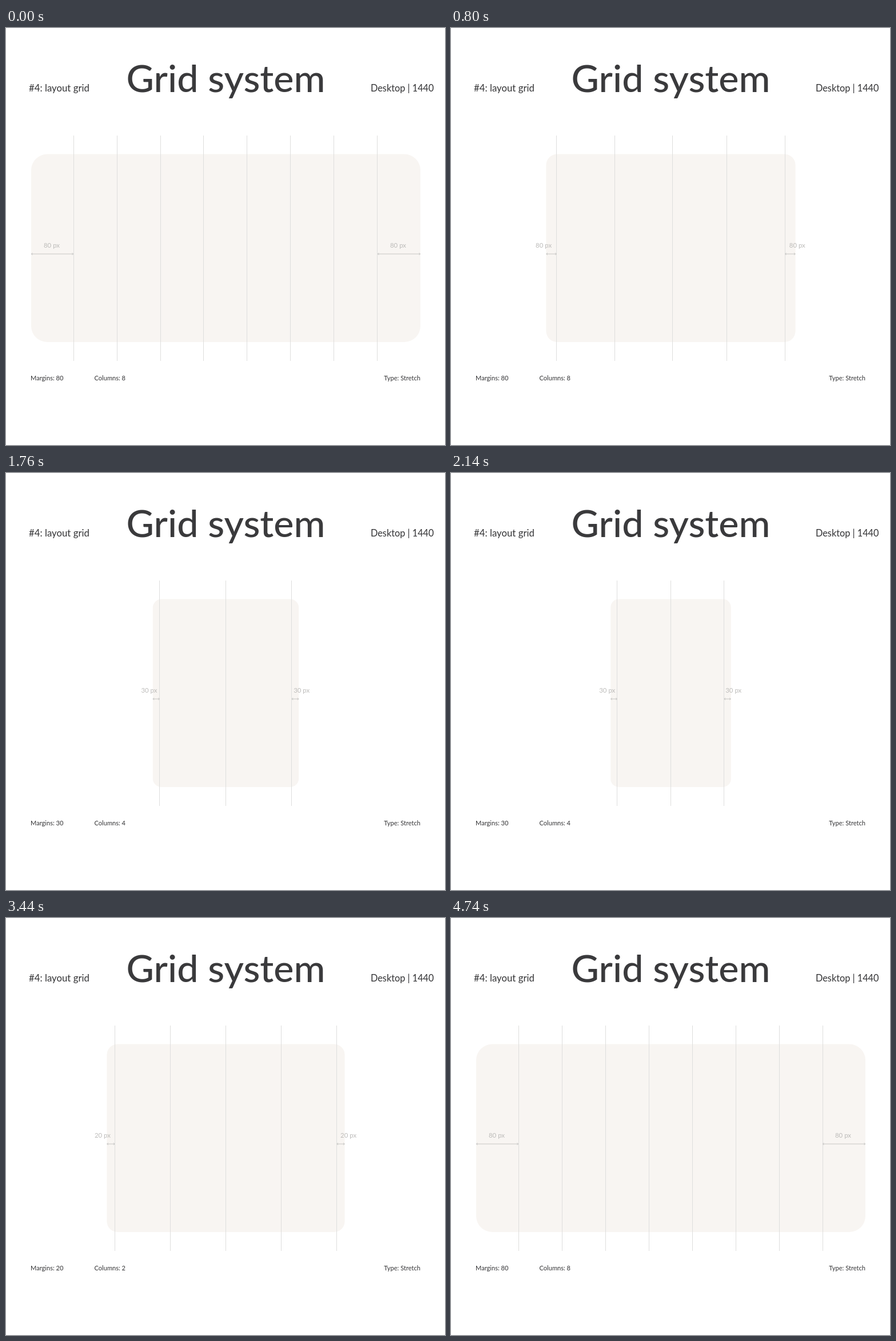
Animation of 768x729 px, one loop 6 s. Source, as an HTML page:

```html
<!DOCTYPE html>
<html lang="en">
<head>
<meta charset="utf-8">
<title>Grid system</title>
<style>
  html, body { margin: 0; width: 100%; height: 100%; overflow: hidden; background: #fff; }
  svg { display: block; width: 100vw; height: 100vh; }
  text { font-family: Lato, "Open Sans", sans-serif; fill: #333335; }
  .title { font-size: 66.5px; font-weight: 500; fill: #3a3a3c; text-anchor: middle; }
  .sub { font-size: 16.8px; }
  .size { font-size: 16.3px; }
  .note { font-size: 11.1px; }
  .end { text-anchor: end; }
  .label { font-size: 11.4px; fill: #bdbcba; text-anchor: middle; }
  .column { stroke: #dededd; shape-rendering: crispEdges; }
  .arrow { stroke: #c6c5c3; fill: none; }
</style>
</head>
<body>
<svg id="stage" viewBox="0 0 768 729">
  <text class="title" x="384.5" y="112">Grid system</text>
  <text class="sub" x="40" y="111">#4: layout grid</text>
  <text class="size end" x="748.5" y="111">Desktop | 1440</text>
  <text class="note" id="margins" x="43" y="616"></text>
  <text class="note" id="columns" x="154.5" y="616"></text>
  <text class="note end" x="725" y="616">Type: Stretch</text>
  <rect id="panel" y="220.5" height="328.5" fill="#f8f5f2"/>
</svg>
<script>
const LOOP = 6000, STEP = 1180, MIRROR = 769;
const stage = document.getElementById('stage');
const panel = document.getElementById('panel');
const marginNote = document.getElementById('margins');
const columnNote = document.getElementById('columns');

// Each layout: panel edge, corner radius, label centres, main grid lines
const desktop = { margin: 80, columns: 8, left: 44, radius: 28, labels: [80, 686], lines: [118, 270, 422, 498, 650] };
const tablet = { margin: 30, columns: 4, left: 176, radius: 18.5, labels: [168.5, 599.5], lines: [190, 287.3, 384.5, 481.8, 579] };
const phone = { margin: 20, columns: 2, left: 281.5, radius: 14, labels: [275.5, 492], lines: [293, 338.8, 384.5, 430, 475.5] };
const sequence = [desktop, tablet, phone, tablet, desktop];

function add(tag, className) {
  const node = document.createElementNS('http://www.w3.org/2000/svg', tag);
  node.setAttribute('class', className);
  return stage.appendChild(node);
}

function set(node, attributes) {
  for (const name in attributes) node.setAttribute(name, attributes[name]);
}

const gridLines = Array.from({ length: 8 }, () => add('line', 'column'));
const arrows = [add('path', 'arrow'), add('path', 'arrow')];
const labels = [add('text', 'label'), add('text', 'label')];
gridLines.forEach(line => set(line, { y1: 188, y2: 582 }));
labels.forEach(label => set(label, { y: 384 }));

const mix = (a, b, p) => a + (b - a) * p;
const clamp = v => Math.min(1, Math.max(0, v));
const bezier = (a, b, s) => 3 * (1 - s) ** 2 * s * a + 3 * (1 - s) * s * s * b + s ** 3;

// cubic-bezier(.4, 0, .2, 1), solved by bisection
function ease(t) {
  if (t <= 0 || t >= 1) return clamp(t);
  let low = 0, high = 1;
  for (let i = 0; i < 24; i++) {
    const s = (low + high) / 2;
    if (bezier(0.4, 0.2, s) < t) low = s; else high = s;
  }
  return bezier(0, 1, low);
}

const arrowPath = (a, b) =>
  `M${a} 395H${b}M${a + 2.5} 393L${a + 0.5} 395L${a + 2.5} 397M${b - 2.5} 393L${b - 0.5} 395L${b - 2.5} 397`;

function draw(time) {
  const index = Math.min(4, Math.floor(time / STEP));
  const from = sequence[index];
  const to = sequence[Math.min(4, index + 1)];
  const p = ease(clamp((time - index * STEP) / STEP));

  // Lines missing from one of the two layouts fade with the move
  const fade = minColumns => {
    const weight = mix(+(from.columns >= minColumns), +(to.columns >= minColumns), p);
    return clamp((weight - 0.35) / 0.35);
  };

  const left = mix(from.left, to.left, p);
  const right = MIRROR - left;
  set(panel, { x: left, width: right - left, rx: mix(from.radius, to.radius, p) });

  const x = from.lines.map((value, i) => mix(value, to.lines[i], p));
  const middle = i => (x[i] + x[i + 1]) / 2;
  const positions = [...x, middle(0), middle(1), middle(3)];
  gridLines.forEach((line, i) => {
    const opacity = i > 4 ? fade(8) : i % 2 ? fade(4) : 1;
    const at = Math.floor(positions[i]) + 0.5;
    set(line, { x1: at, x2: at, opacity });
  });

  set(arrows[0], { d: arrowPath(left, x[0]) });
  set(arrows[1], { d: arrowPath(x[4], right) });
  labels.forEach((label, i) => {
    set(label, { x: mix(from.labels[i], to.labels[i], p) });
    label.textContent = `${from.margin} px`;
  });
  marginNote.textContent = `Margins: ${from.margin}`;
  columnNote.textContent = `Columns: ${from.columns}`;
}

const start = performance.now();
function tick() {
  draw((performance.now() - start) % LOOP);
  requestAnimationFrame(tick);
}
draw(0);
requestAnimationFrame(tick);
</script>
</body>
</html>
```
